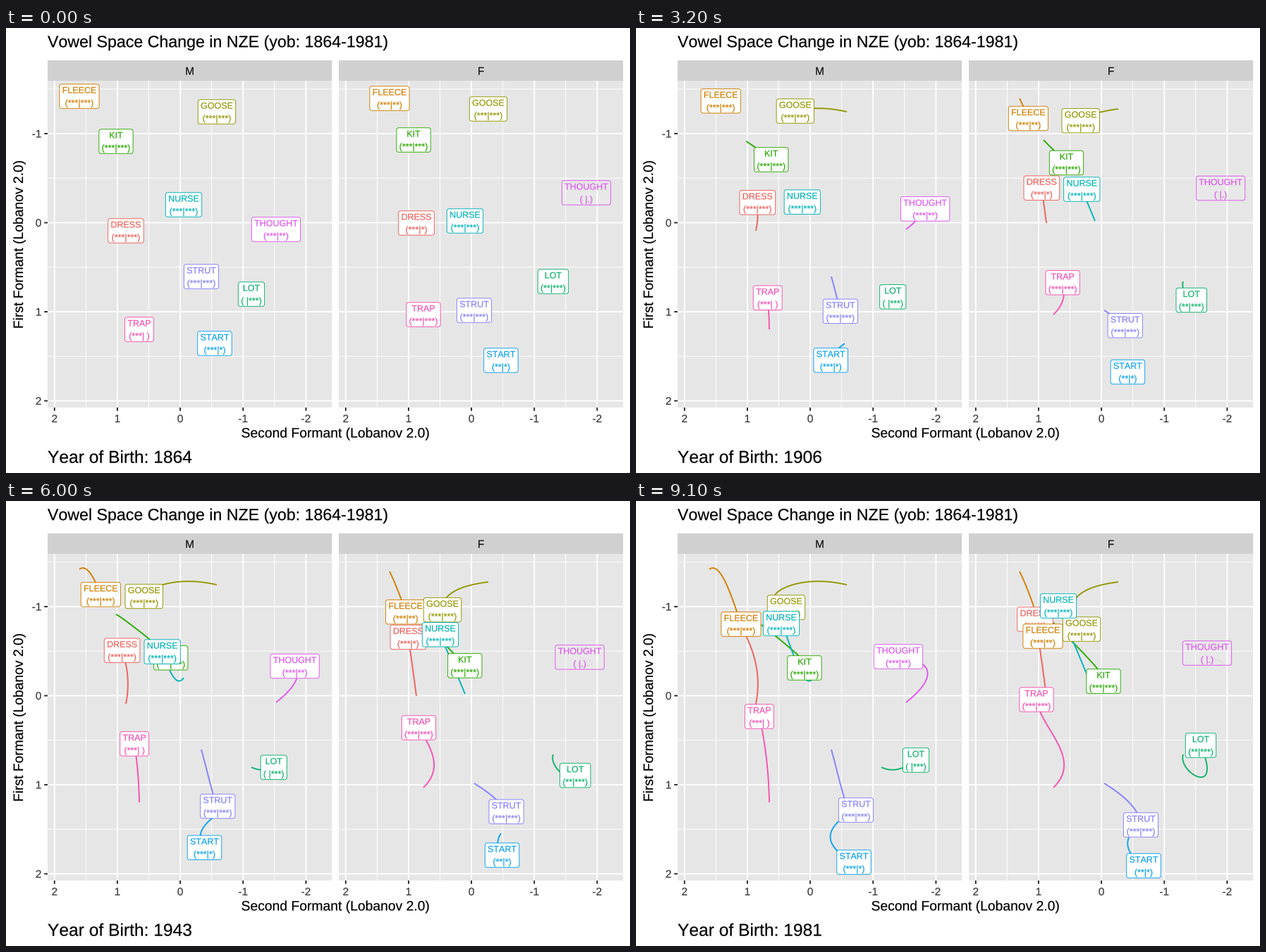
A matplotlib script that plays this animation: 885x632 px, repeating every 10000 ms.

```python
import numpy as np
import matplotlib.pyplot as plt
from matplotlib.animation import FuncAnimation
from matplotlib.patches import FancyBboxPatch, PathPatch, Rectangle
from matplotlib.path import Path
from matplotlib.textpath import TextPath
from matplotlib.transforms import Affine2D

W, H, DPI = 885, 632, 64
FRAMES, LAST = 100, 89
FIRST_YEAR, LAST_YEAR = 1864, 1981

PT = 1.7556                     # pixels per point
TITLE, AXIS, SMALL, CAPTION, LABEL = (PT * s for s in (13.2, 11, 8.8, 14, 7.11))
PAD, GAP, CAP = 3.8, 1.44 * LABEL, 0.716 * LABEL
THICK, THIN = 1.87, 0.94

COLORS = {
    "DRESS": "#f0605a", "FLEECE": "#d07f00", "GOOSE": "#939600",
    "KIT": "#29a900", "LOT": "#0cb36b", "NURSE": "#00b3b9",
    "START": "#0ca2f0", "STRUT": "#847fff", "THOUGHT": "#de55ee",
    "TRAP": "#f94fb0",
}

# Significance, then the key points of a smooth path, evenly spaced in time
MEN = {
    "DRESS": ("***|***", (170, 288), (170, 232), (147, 175)),
    "FLEECE": ("***|***", (104, 97), (119, 102), (134, 132), (149, 175)),
    "GOOSE": ("***|***", (299, 119), (230, 117), (196, 135), (213, 151)),
    "KIT": ("***|***", (156, 161), (188, 184), (233, 222), (239, 237)),
    "LOT": (" |***", (348, 378), (371, 381), (397, 368)),
    "NURSE": ("***|***", (252, 251), (237, 249), (222, 215), (206, 174)),
    "START": ("***|*", (296, 448), (276, 481), (309, 513)),
    "STRUT": ("***|***", (277, 353), (289, 399), (300, 433), (312, 439)),
    "THOUGHT": ("***|**", (383, 286), (409, 259), (410, 235), (372, 221)),
    "TRAP": ("***| ", (189, 428), (185, 366), (175, 306)),
}
WOMEN = {
    "DRESS": ("***|*", (582, 277), (573, 211), (566, 168)),
    "FLEECE": ("***|**", (544, 100), (561, 141), (577, 192)),
    "GOOSE": ("***|***", (684, 115), (633, 130), (619, 154), (632, 182)),
    "KIT": ("***|***", (578, 159), (607, 188), (650, 233), (663, 256)),
    "LOT": ("**|***", (776, 360), (786, 385), (807, 390), (801, 347)),
    "NURSE": ("***|***", (651, 274), (599, 149)),
    "START": ("**|*", (702, 472), (699, 495), (720, 518)),
    "STRUT": ("***|***", (664, 401), (702, 431), (716, 460)),
    "THOUGHT": (" |.", (823, 234), (830, 228), (814, 222), (810, 216)),
    "TRAP": ("***|***", (592, 407), (606, 365), (586, 323), (568, 282)),
}

fig = plt.figure(figsize=(W / DPI, H / DPI), dpi=DPI, facecolor="white")
ax = fig.add_axes([0, 0, 1, 1])
ax.set_xlim(0, W)
ax.set_ylim(H, 0)
ax.axis("off")


def lw(px):
    return px * 72 / DPI


def outline(s):
    return TextPath((0, 0), s, size=100, prop={"family": "Liberation Sans"})


def ink(s):
    return outline(s).get_extents().width


glyph_cache = {}


def glyph(ch):
    """Outline and unkerned advance of one character at size 100."""
    if ch not in glyph_cache:
        shape = None if ch == " " else outline(ch)
        glyph_cache[ch] = shape, ink("H" + ch + "H") - ink("HH")
    return glyph_cache[ch]


def line_width(s, size):
    return sum(glyph(ch)[1] for ch in s) * size / 100


def line_path(s, size, align=0.0):
    """Text outline with its baseline on y = 0; align 0 left, 1 right."""
    x, verts, codes = 0, [], []
    for ch in s:
        shape, advance = glyph(ch)
        if shape is not None:
            verts.append(shape.vertices + (x, 0))
            codes.append(shape.codes)
        x += advance
    v = (np.vstack(verts) - (align * x, 0)) * (size / 100, -size / 100)
    return Path(v, np.hstack(codes))


def add(patch, z):
    patch.set_snap(False)
    patch.set_zorder(z)
    return ax.add_patch(patch)


def write(s, x, y, size, color="black", align=0.0, angle=0, base=Affine2D()):
    place = Affine2D().rotate_deg(angle).translate(x, y) + base
    return add(PathPatch(line_path(s, size, align), fc=color, ec=color, lw=lw(0.2),
                         transform=place + ax.transData), 3)


def rule(xs, ys, color, width):
    ax.plot(xs, ys, color=color, lw=lw(width), zorder=1, snap=False,
            solid_capstyle="butt")


def draw_panel(left, name):
    right, top, bottom = left + 403.2, 75, 539
    add(Rectangle((left, 46), right - left, top - 46, fc="#d0d0d0", ec="none"), 0)
    add(Rectangle((left, top), right - left, bottom - top, fc="#e6e6e6", ec="none"), 0)
    write(name, (left + right) / 2, 66.4, SMALL, "#0f0f0f", 0.5)

    def px(v):
        return left + 188.1 - 89.15 * v

    def py(v):
        return 276.5 + 126.5 * v

    for v in np.arange(-1.5, 2):
        rule([px(v)] * 2, [top, bottom], "white", THIN)
        rule([left, right], [py(v)] * 2, "white", THIN)
    for v in range(-2, 3):
        rule([px(v)] * 2, [top, bottom], "white", THICK)
        rule([px(v)] * 2, [bottom, bottom + 4.8], "#232323", THICK)
        write(str(v), px(v), 560, SMALL, "#3b3b3b", 0.5)
    for v in range(-1, 3):
        rule([left, right], [py(v)] * 2, "white", THICK)
        if name == "M":
            rule([left - 4.8, left], [py(v)] * 2, "#232323", THICK)
            write(str(v), 50.4, py(v) + 5.5, SMALL, "#3b3b3b", 1)


class Vowel:
    def __init__(self, name, stars, *keys):
        n = len(keys)
        self.curve = np.polyfit(np.linspace(0, 1, n), keys, n - 1)
        self.move = Affine2D()
        color = COLORS[name]
        alpha = 1 if "*" in stars else 0.1
        self.trail, = ax.plot([], [], color=color, alpha=alpha, lw=lw(THICK),
                              zorder=2, solid_capstyle="butt")
        lines = name, f"({stars})"
        w = max(line_width(s, LABEL) for s in lines) + 2 * PAD
        h = GAP + CAP + 2 * PAD
        add(FancyBboxPatch((-w / 2, -h / 2), w, h,
                           boxstyle="round,pad=0,rounding_size=3",
                           fc=(1, 1, 1, alpha), ec=color, lw=lw(THIN),
                           transform=self.move + ax.transData), 3)
        for s, side in zip(lines, (-1, 1)):
            write(s, 0, (CAP + side * GAP) / 2, LABEL, color, 0.5, base=self.move)

    def at(self, u):
        return [np.polyval(c, u) for c in self.curve.T]

    def show(self, u):
        self.trail.set_data(*self.at(np.linspace(0, u, 90)))
        self.move.clear().translate(*self.at(u))


draw_panel(59, "M")
draw_panel(472, "F")
write("Vowel Space Change in NZE (yob: 1864-1981)", 59, 27.2, TITLE)
write("Second Formant (Lobanov 2.0)", 467.2, 581.5, AXIS, align=0.5)
write("First Formant (Lobanov 2.0)", 24, 307.5, AXIS, align=0.5, angle=-90)
caption = write("Year of Birth: 1864", 59, 617.6, CAPTION)
vowels = [Vowel(name, *group[name]) for group in (MEN, WOMEN) for name in COLORS]


def update(i):
    u = min(i / LAST, 1)
    year = round(FIRST_YEAR + (LAST_YEAR - FIRST_YEAR) * u)
    caption.set_path(line_path(f"Year of Birth: {year}", CAPTION))
    for vowel in vowels:
        vowel.show(u)
    return []


anim = FuncAnimation(fig, update, frames=FRAMES, interval=100, repeat=True,
                     repeat_delay=0, init_func=lambda: [])
plt.show()
```
